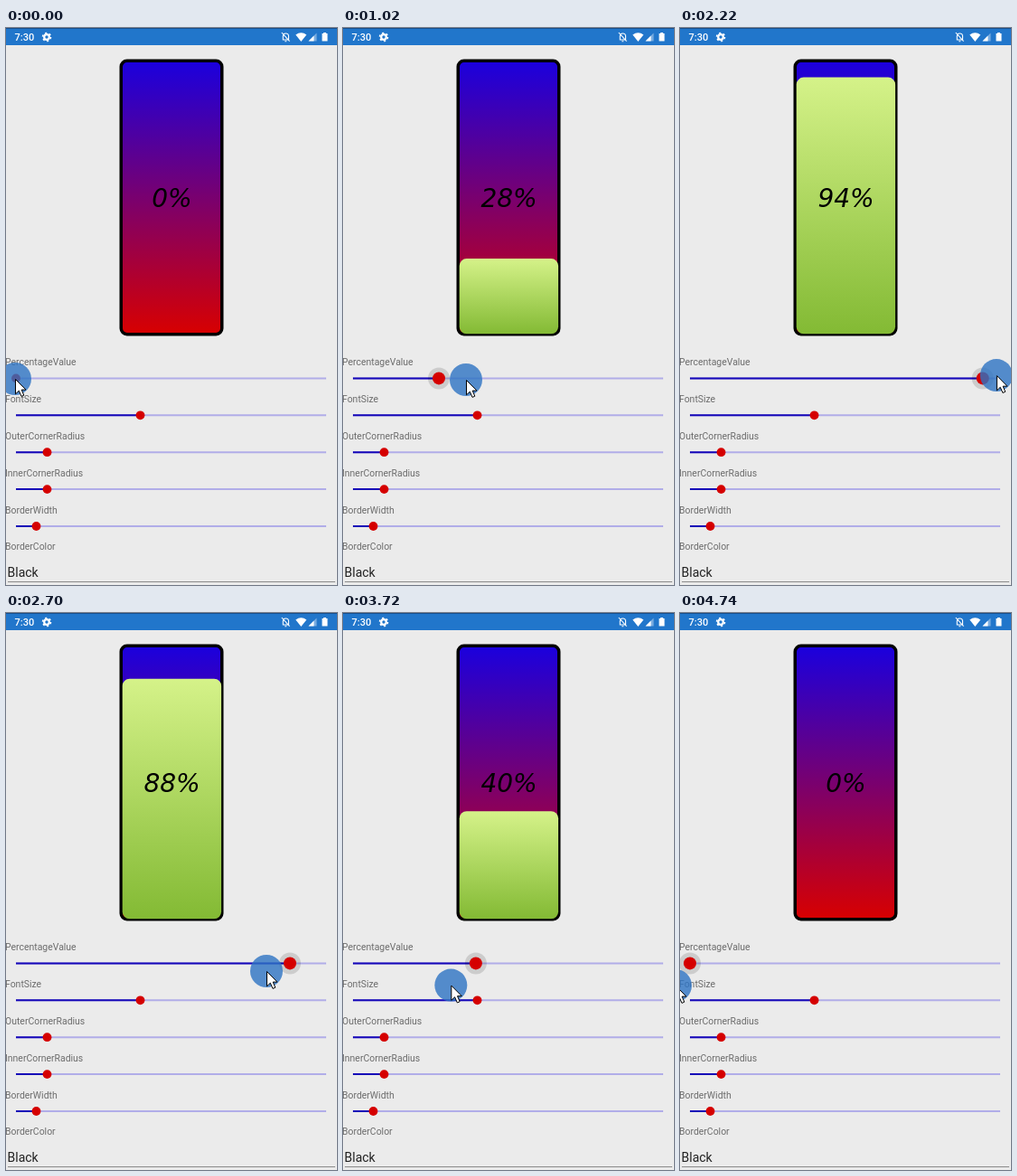
Recreate the animation shown at these times as an HTML page. Size 366x616 px, loop 4.8 s.

```html
<!DOCTYPE html>
<html lang="en">
<head>
<meta charset="utf-8">
<title>Percentage gauge</title>
<style>
html, body { margin: 0; width: 100%; height: 100%; overflow: hidden; background: #ebebeb; }
svg { display: block; }
text { font-family: Roboto, sans-serif; }
.label { font-size: 10.45px; fill: #6c6c6c; }
.rail { stroke: #b1ade8; stroke-width: 2; }
.run { stroke: #1608b8; stroke-width: 2; }
.thumb { fill: #d50000; }
#value { font: italic 28px "DejaVu Sans", sans-serif; text-anchor: middle; }
</style>
</head>
<body>
<svg width="366" height="616" viewBox="0 0 366 616">
  <defs>
    <linearGradient id="back" x2="0" y2="1">
      <stop stop-color="#1a00de"/><stop offset="1" stop-color="#d80000"/>
    </linearGradient>
    <linearGradient id="lime" x2="0" y2="1">
      <stop stop-color="#d5f289"/><stop offset="1" stop-color="#83ba34"/>
    </linearGradient>
  </defs>
  <rect width="366" height="616" fill="#ebebeb"/>

  <rect width="366" height="19" fill="#2176cb"/>
  <rect width="366" height="1" fill="#174f8c"/>
  <text x="9.5" y="14" font-size="11" font-weight="500" fill="#fff">7:30</text>
  <g fill="none" stroke="#fff">
    <circle cx="45" cy="10" r="2.8" stroke-width="2.2"/>
    <circle cx="45" cy="10" r="4.5" stroke-width="1.6" stroke-dasharray="2.1 2.612"/>
    <path d="M305.8 13H312.5V9Q312.5 6 309.3 6Q306.3 6 306.3 9V13M308.3 14.8H310.3M304.8 5L313.6 14.6" stroke-width="1.1"/>
  </g>
  <path d="M320.3 7.6Q326.3 2.8 332.3 7.6L326.3 15Z" fill="#fff"/>
  <path d="M343.5 5.5V14.5H334.5Z" fill="#fff" opacity=".4"/>
  <path d="M340.5 8.5V14.5H334.5Z" fill="#fff"/>
  <path d="M349.5 6H351V5H354V6H355.5V14.5H349.5Z" fill="#fff"/>

  <rect x="127.25" y="36.25" width="111.5" height="302.5" rx="6.5" fill="url(#back)" stroke="#000" stroke-width="3.5"/>
  <rect id="fill" x="128.7" width="109.4" rx="8" fill="url(#lime)"/>
  <text id="value" x="183.5" y="198.3"></text>

  <g id="sliders"></g>
  <text class="label" x="-1" y="577.3">BorderColor</text>
  <text x="1.5" y="607" font-size="14" fill="#222">Black</text>
  <path d="M2 612.5H364" stroke="#8a8a8a"/>

  <g id="pointer">
    <circle r="18" fill="#2d73c3" fill-opacity=".8"/>
    <path d="M.5 .5V16.8L4.3 13.2L7 19.4L9.8 18.2L7.2 12.1H12Z" fill="#fff" stroke="#000"/>
  </g>
</svg>
<script>
const LOOP = 4800, STEP = 60, LAG = 140;
const LEFT = 11, WIDTH = 343, BOTTOM = 338.3, HEIGHT = 300.6;
const $ = id => document.getElementById(id);

// Pointer path: time, x, y
const path = [
  [0, 10, 388], [260, 10, 388], [400, 27, 388], [880, 106, 389],
  [1020, 136, 389], [1480, 251, 384], [1600, 263.5, 382], [1740, 291, 380],
  [2160, 345, 383], [2270, 354, 385], [2560, 314, 392], [2700, 288, 396],
  [3160, 225, 403], [3300, 202, 405], [3940, 76, 415], [4080, 66, 416],
  [4320, 27, 415], [4740, -5, 412]
];

const rows = [["PercentageValue", 11], ["FontSize", 148.5], ["OuterCornerRadius", 45.5],
  ["InnerCornerRadius", 45.5], ["BorderWidth", 33.5]];

$("sliders").innerHTML = rows.map(([name, x], i) => {
  const y = 387.4 + i * 40.9;
  return `<text class="label" x="-1" y="${y - 14.4}">${name}</text>
    <path class="rail" d="M${LEFT} ${y}H${LEFT + WIDTH}"/>
    <path class="run" d="M${LEFT} ${y}H${x}"/>
    <circle class="halo" cx="${x}" cy="${y}" r="12" fill-opacity=".13" visibility="hidden"/>
    <circle class="thumb" cx="${x}" cy="${y}" r="4.9"/>`;
}).join("");

const [run, halo, thumb] = ["run", "halo", "thumb"].map(c => document.querySelector("." + c));

function pointerAt(t) {
  const i = path.findIndex(p => p[0] > t);
  if (i < 0) return path[path.length - 1].slice(1);
  if (i === 0) return path[0].slice(1);
  const a = path[i - 1], b = path[i], k = (t - a[0]) / (b[0] - a[0]);
  return [a[1] + (b[1] - a[1]) * k, a[2] + (b[2] - a[2]) * k];
}

function draw(t) {
  const [px, py] = pointerAt(t);
  const x = Math.min(LEFT + WIDTH, Math.max(LEFT, pointerAt(t - LAG)[0]));
  const part = (x - LEFT) / WIDTH, pressed = t >= 120;

  $("pointer").setAttribute("transform", `translate(${px} ${py})`);
  run.setAttribute("d", `M${LEFT} 387.4H${x}`);
  halo.setAttribute("cx", x);
  halo.setAttribute("visibility", pressed ? "visible" : "hidden");
  thumb.setAttribute("cx", x);
  thumb.setAttribute("r", pressed ? 7 : 4.9);
  $("fill").setAttribute("y", BOTTOM - HEIGHT * part);
  $("fill").setAttribute("height", HEIGHT * part);
  $("value").textContent = Math.round(part * 100) + "%";
}

const start = performance.now();
function tick() {
  const t = (performance.now() - start) % LOOP;
  draw(Math.floor(t / STEP) * STEP);
  requestAnimationFrame(tick);
}
tick();
</script>
</body>
</html>
```
